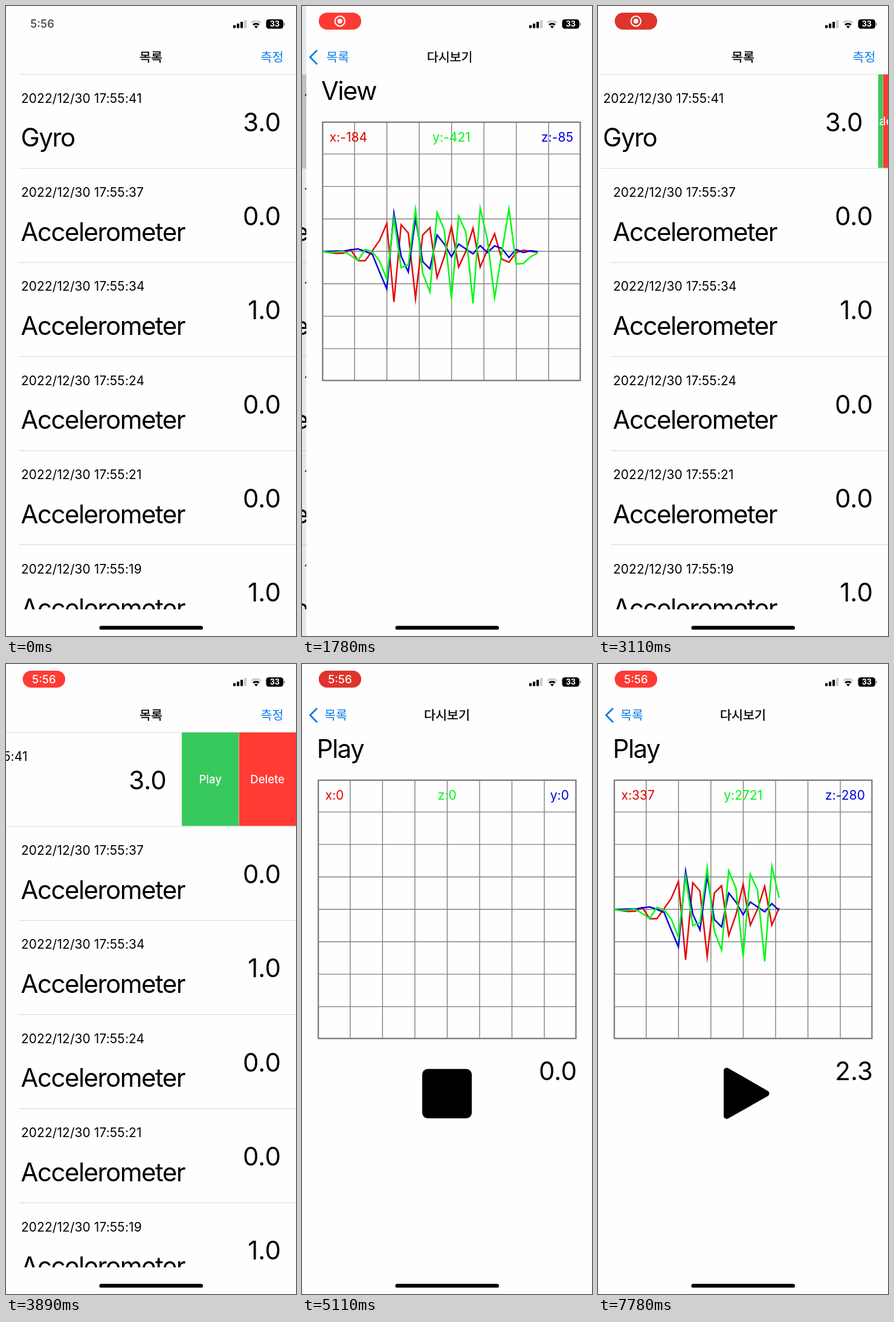
An HTML page that plays this animation: 480 px wide and 1040 px high, repeating every 8000 ms.

```html
<!DOCTYPE html>
<html lang="ko">
<head>
<meta charset="utf-8">
<title>Sensor list</title>
<style>
  html, body { margin: 0; width: 100%; height: 100%; overflow: hidden; background: #fefefe; }
  svg { display: block; font-family: Inter, "Noto Sans CJK KR", "Noto Sans CJK JP", "Noto Sans CJK", sans-serif; font-optical-sizing: none; }
  .small { font-size: 20.9px; letter-spacing: .12px; }
  .big { font-size: 42px; letter-spacing: -1.53px; }
  .num { font-size: 42px; text-anchor: end; }
  .mid { text-anchor: middle; }
  .end { text-anchor: end; }
  .nav { font-family: "Noto Sans CJK KR", "Noto Sans CJK JP", "Noto Sans CJK", sans-serif; font-size: 20.6px; text-anchor: middle; }
  .bold { font-weight: 500; }
  .nav.bold { stroke: #000; stroke-width: .4; }
  .blue { fill: #0a7be8; }
  .line { stroke: #dcdcde; stroke-width: 1.2; }
  .grid { fill: none; stroke: #808080; }
  .plot { fill: none; stroke-width: 2.5; stroke-miterlimit: 10; }
</style>
</head>
<body>
<svg id="stage" width="100%" height="100%" viewBox="0 0 480 1040">
  <defs>
    <clipPath id="table"><rect x="-10" y="112" width="700" height="884"/></clipPath>
  </defs>
  <rect width="480" height="1040" fill="#fefefe"/>

  <g id="list">
    <g clip-path="url(#table)">
      <rect id="mark" y="113" width="480" height="155" fill="#d1d1d6"/>
      <g id="rows"></g>
      <svg id="playBtn" y="113" height="154.5">
        <rect width="100%" height="100%" fill="#37c95c"/>
        <text x="50%" y="84" class="mid bold" font-size="18.5" fill="#fff">Play</text>
      </svg>
      <svg id="delBtn" y="113" height="154.5">
        <rect width="100%" height="100%" fill="#ff3b33"/>
        <text x="50%" y="84" class="mid bold" font-size="18.5" fill="#fff">Delete</text>
      </svg>
    </g>
  </g>
  <rect id="dim" width="480" height="1040" fill="#2c0e4a"/>

  <g id="page">
    <rect width="480" height="1040" fill="#fefefe"/>
    <text id="heading" class="big" x="24.6" y="154.5"></text>
    <path id="cells" class="grid" stroke-width="1.4"/>
    <rect class="grid" x="27" y="191.8" width="426.4" height="426.4" stroke-width="2.4"/>
    <g id="plots"></g>
    <text id="left" class="small" x="38.4" y="224" fill="#e00000"/>
    <text id="center" class="small mid" x="240.3" y="224" fill="#00f514"/>
    <text id="right" class="small end" x="442" y="224" fill="#0000e0"/>
    <g id="player">
      <text id="timer" class="num" x="454.9" y="687"></text>
      <rect id="stop" x="199" y="668.5" width="82" height="81.5" rx="9"/>
      <path id="start" d="M213 671.5V746L278.5 709Z" stroke="#000" stroke-width="10" stroke-linejoin="round"/>
    </g>
  </g>

  <text id="listTitle" class="nav bold" x="240" y="91.8">목록</text>
  <text id="measure" class="nav blue" x="440.5" y="91.8">측정</text>
  <text id="pageTitle" class="nav bold" y="91.8">다시보기</text>
  <g id="back">
    <path d="M25 73L13.5 84.6L25 96.2" fill="none" stroke="#0a7be8" stroke-width="2.8"/>
    <text id="backLabel" class="nav blue" y="91.8">목록</text>
  </g>

  <text id="clock" class="mid" x="60" y="36.4" font-size="18" font-weight="600" fill="#555">5:56</text>
  <g id="pill">
    <rect id="pillBg" x="27.7" y="11" width="70.3" height="28" rx="14"/>
    <g id="recIcon">
      <circle cx="62.7" cy="25" r="8.2" fill="none" stroke="#fff" stroke-width="2"/>
      <circle cx="62.7" cy="25" r="4" fill="#fff"/>
    </g>
    <text id="pillTime" class="mid bold" x="62.8" y="31.5" font-size="18.5" fill="#fff">5:56</text>
  </g>
  <g id="bars"></g>
  <g fill="none" stroke-width="3">
    <path d="M406 28A11.3 11.3 0 0 1 422 28" stroke="#ccc"/>
    <path d="M409.2 31.2A6.8 6.8 0 0 1 418.8 31.2" stroke="#000"/>
  </g>
  <path d="M414 37L411.2 33.8A4 4 0 0 1 416.8 33.8Z"/>
  <rect x="430.5" y="22" width="28.5" height="15.6" rx="4.6"/>
  <path d="M460 27.4Q462.4 29.8 460 32.2Z"/>
  <text class="mid" x="444.8" y="34.4" font-size="12.6" font-weight="700" fill="#fff">33</text>
  <rect x="154.5" y="1023.2" width="171.5" height="6.4" rx="3.2"/>
</svg>

<script>
const $ = id => document.getElementById(id);
const set = (id, attrs) => {
  for (const k in attrs) $(id).setAttribute(k, attrs[k]);
};
const clamp = v => Math.max(0, Math.min(1, v));
const ramp = (t, a, b) => clamp((t - a) / (b - a));
const smooth = v => v * v * (3 - 2 * v);

// Critically damped slide, snapped once it has settled.
function spring(t, rate) {
  if (t <= 0) return 0;
  const rest = (1 + rate * t) * Math.exp(-rate * t);
  return rest < .004 ? 1 : 1 - rest;
}

const LOOP = 8, PUSH = 1.2665, POP = 2.3915, POPPED = 2.8915, REPLAY = 4.1, RUN = 5.07, HALT = 7.42;
const SLIDE = 189.2, ROW = 155.35, UNIT = 142;

const records = [
  ['41', 'Gyro', '3.0'], ['37', 'Accelerometer', '0.0'], ['34', 'Accelerometer', '1.0'],
  ['24', 'Accelerometer', '0.0'], ['21', 'Accelerometer', '0.0'], ['19', 'Accelerometer', '1.0']
];

// Samples every 0.1 s, as heights above the middle line.
const data = {
  x: [0, -2, -3.6, -3, 2.8, -15.5, -15.5, 1, 18, 46, -83.5, 44, 30, -78, 27, 39,
    -42.972, -9, 41, -26, 0, 38, -26, 2.373, 29, -13, -18, -2, 2, 0, -1.296],
  z: [0, 0, .4, .6, 2.5, 4, 0, -5, -34, -62, 63, -8, -34, 55, -17, -29,
    26.958, 12, -9, 12, 4, -4, 9.5, -1.972, 9, 5, -10, 3, -2, 1, -.6],
  y: [0, -2, -1.2, 0, -7, -15, 3, -.6, -16, -46, 54, -27, -22, 69, -36, -67,
    63.852, 35, -78, 58, 32, -86, 71, 19.162, -77, -2, 70, -21, -20, -9, -2.965]
};
const ink = { x: '#e60808', z: '#0404dc', y: '#00fa14' };

function build() {
  $('rows').innerHTML = records.map(([sec, name, value], i) => {
    const line = y => `<path class="line" d="M21 ${y}H680"/>`;
    return `<g id="row${i}" transform="translate(0 ${i * ROW})">
      ${i ? '' : line(113)}${line(268)}
      <text class="small" x="24.9" y="159.8">2022/12/30 17:55:${sec}</text>
      <text class="big" x="24.6" y="232.3">${name}</text>
      <text class="num" x="454.9" y="206.6">${value}</text></g>`;
  }).join('');

  let d = '';
  for (let i = 1; i < 8; i++) {
    const s = i * 53.55;
    d += `M${26.2 + s} 191V619M26 ${190.8 + s}H454`;
  }
  set('cells', { d });

  $('plots').innerHTML = Object.keys(data)
    .map(k => `<path id="plot-${k}" class="plot" stroke="${ink[k]}"/>`).join('');
  $('bars').innerHTML = [5, 7.6, 10.6, 13.6].map((h, i) =>
    `<rect x="${376 + i * 6}" y="${36.6 - h}" width="4.2" height="${h}" rx="1" fill="${i < 3 ? '#000' : '#ccc'}"/>`).join('');
}

function drawPage(t) {
  const replay = t >= REPLAY;
  const n = replay ? Math.floor((Math.min(t, HALT) - RUN) * 10 + 1e-6) : 30;
  const count = Math.max(0, n);
  const running = t >= RUN && t < HALT;
  const label = k => k + ':' + Math.round(data[k][count] * UNIT);

  for (const k in data) {
    const pts = data[k].slice(0, count + 1)
      .map((v, i) => `${(26 + i * 11.9).toFixed(2)} ${(405 - v).toFixed(2)}`);
    set('plot-' + k, { d: count ? 'M' + pts.join('L') : '' });
  }
  $('heading').textContent = replay ? 'Play' : 'View';
  $('left').textContent = label('x');
  $('center').textContent = count ? label('y') : 'z:0';
  $('right').textContent = count ? label('z') : 'y:0';
  $('timer').textContent = (count / 10).toFixed(1);
  set('player', { opacity: replay ? 1 : 0 });
  set('stop', { opacity: running ? 1 : 0 });
  set('start', { opacity: running ? 0 : 1 });
}

function drawNav(q, leaving) {
  const gone = 1 - q;
  const listOpacity = leaving ? clamp((gone - .3) / .7) : gone;
  set('listTitle', { x: 240 - 184 * q, opacity: listOpacity });
  set('measure', { opacity: listOpacity });
  set('pageTitle', {
    x: 240 + 255 * gone,
    opacity: leaving ? clamp(1 - 3.45 * gone) : clamp((q - .3) / .7)
  });
  set('back', { opacity: leaving ? clamp(1 - 2.45 * gone) : q });
  set('backLabel', { x: 240 - 184 * q });
}

function drawStatus(t) {
  const glow = (1 + Math.cos(Math.PI * (t - 1.945))) / 2;
  const mix = (a, b) => Math.round(a + (b - a) * glow);
  const swap = ramp(t, 3.2, 3.4);
  set('clock', { opacity: 1 - ramp(t, .03, .2) });
  set('pill', { opacity: ramp(t, .1, .45) });
  set('pillBg', { fill: `rgb(${mix(220, 255)},${mix(52, 59)},${mix(43, 52)})` });
  set('recIcon', { opacity: 1 - swap });
  set('pillTime', { opacity: swap });
}

function draw(t) {
  const leaving = t >= POP && t < REPLAY;
  const shown = lag => leaving ? 1 - smooth(ramp(t, POP, POPPED))
    : spring(t - (t < POP ? PUSH : REPLAY) - lag, 12);
  const p = shown(0);
  const open = SLIDE * smooth(ramp(t, 2.98, 3.7));

  set('list', { transform: `translate(${-144 * p} 0)` });
  set('mark', { opacity: t >= 1.215 && t < 2.05 ? 1 : 0 });
  set('row0', { transform: `translate(${-open} 0)` });
  set('playBtn', { x: 480 - open, width: open / 2 });
  set('delBtn', { x: 480 - open / 2, width: open / 2 });
  set('dim', { opacity: .1 * p });
  set('page', { transform: `translate(${480 * (1 - p)} 0)` });

  drawPage(t);
  drawNav(shown(.018), leaving);
  drawStatus(t);
}

build();
const begin = performance.now();
function tick() {
  draw((performance.now() - begin) / 1000 % LOOP);
  requestAnimationFrame(tick);
}
tick();
</script>
</body>
</html>
```
